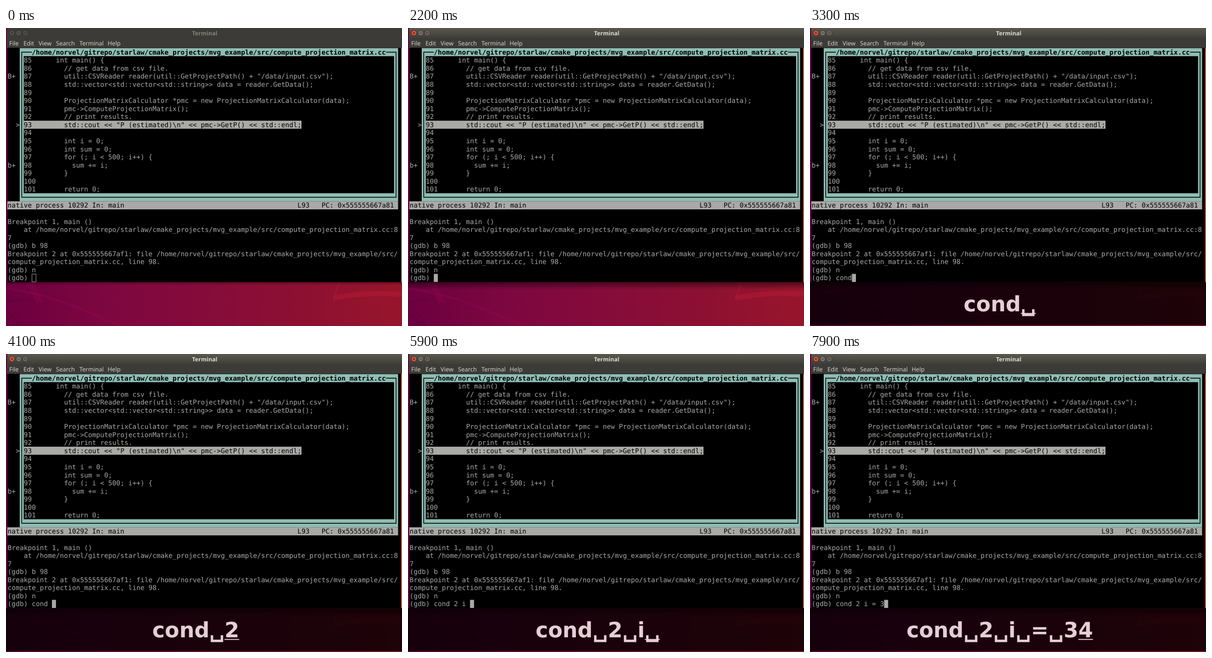
Animation of 863x649 px, one loop 8000 ms. Source, as an HTML page with a canvas:

```html
<!DOCTYPE html>
<html lang="en">
<head>
<meta charset="utf-8">
<title>Terminal</title>
<style>
html, body { margin: 0; width: 100%; height: 100%; overflow: hidden; background: #000; }
canvas { display: block; }
</style>
</head>
<body>
<canvas id="stage" width="863" height="649"></canvas>
<script>
const W = 863, H = 649, LOOP = 8000;
const ctx = document.getElementById('stage').getContext('2d');
const keys = document.createElement('canvas');
keys.width = W;
keys.height = H;
const kctx = keys.getContext('2d');

// Terminal grid
const CW = 8.772, RH = 17.56, X0 = 3.6, Y0 = 43.8;
const MONO = '14.57px "DejaVu Sans Mono", monospace';
const UI = '"Open Sans", "Noto Sans", sans-serif';
const GREY = '#a9a9a7', TEAL = '#8fbdb3', BAR = '#3c3b37', BOTTOM = 553.5;
const colX = c => X0 + c * CW;
const rowY = r => Y0 + r * RH;

const DIR = '/home/norvel/gitrepo/starlaw/cmake_projects/mvg_example/src/';
const FILE = 'compute_projection_matrix.cc';
const SOURCE = [
  'int main() {',
  '  // get data from csv file.',
  '  util::CSVReader reader(util::GetProjectPath() + "/data/input.csv");',
  '  std::vector<std::vector<std::string>> data = reader.GetData();',
  '',
  '  ProjectionMatrixCalculator *pmc = new ProjectionMatrixCalculator(data);',
  '  pmc->ComputeProjectionMatrix();',
  '  // print results.',
  '  std::cout << "P (estimated)\\n" << pmc->GetP() << std::endl;',
  '',
  '  int i = 0;',
  '  int sum = 0;',
  '  for (; i < 500; i++) {',
  '    sum += i;',
  '  }',
  '',
  '  return 0;'
];
const LOG = [
  'Breakpoint 1, main ()',
  '    at ' + DIR + FILE + ':8',
  '7',
  '(gdb) b 98',
  'Breakpoint 2 at 0x555555667af1: file ' + DIR,
  FILE + ', line 98.',
  '(gdb) n'
];

// Timing: when each key reaches the shell, and when it shows in the key display
const COMMAND = 'cond 2 i = 34';
const TYPED = [2500, 2700, 2800, 3000, 3500, 4300, 4800, 5500, 5900, 6400, 6900, 7300];
const SHOWN = [2400, 2500, 2700, 2800, 3300, 4100, 4700, 5300, 5900, 6200, 6700, 7100, 7900];
const MARKED = [[3300, 3500], [4100, 4300], [4700, 5000], [5300, 5500], [5900, 6400], [6700, 6900], [7100, 7300], [7900, 8000]];
const BLINK = [[1900, 2200], [3900, 4100], [4700, 4800], [7700, 7900]];
const FADE = [[2600, 1], [2500, 0.75], [2400, 0.35]];

const count = (times, t) => times.filter(x => x <= t).length;
const within = (spans, t) => spans.some(([a, b]) => t >= a && t < b);

function rect(x, y, w, h, fill) {
  ctx.fillStyle = fill;
  ctx.fillRect(x, y, w, h);
}

function text(str, x, y, font, fill, align = 'left') {
  ctx.font = font;
  ctx.fillStyle = fill;
  ctx.textAlign = align;
  ctx.fillText(str, x, y);
}

function cell(str, col, row, fill = GREY, weight = '') {
  text(str, colX(col), rowY(row) + 14, weight + MONO, fill);
}

function path(d, color, width) {
  ctx.strokeStyle = color;
  ctx.lineWidth = width;
  ctx.stroke(new Path2D(d));
}

function gradient(x0, y0, x1, y1, ...stops) {
  const g = ctx.createLinearGradient(x0, y0, x1, y1);
  stops.forEach((c, i) => g.addColorStop(i / (stops.length - 1), c));
  return g;
}

function wallpaper(focus) {
  rect(0, 0, W, H, gradient(0, 620, W, 580, '#6c0040', '#7d0740', '#850b3a', '#8d1032', '#98152b'));
  path('M0 567 Q75 578 135 601 T250 649', 'rgba(150,10,85,.28)', 5);
  path('M52 554 L74 598', 'rgba(150,10,85,.28)', 14);
  path('M0 598 Q40 585 74 598', 'rgba(80,0,50,.22)', 3);
  path('M726 554 L714 590', 'rgba(185,30,52,.35)', 4);
  path('M713 588 Q785 574 863 580', 'rgba(185,30,52,.42)', 11);
  path('M563 554 V649 M430 590 L563 600 L640 649', 'rgba(170,25,60,.13)', 2);
  path('M8 630 l8 -4 M18 634 l10 -7 M12 642 l14 -4 M28 640 l12 5 M22 648 l8 -5', 'rgba(60,0,40,.3)', 2);
  const depth = 7 + 9 * focus;
  rect(0, BOTTOM, W, depth, gradient(0, BOTTOM, 0, BOTTOM + depth, `rgba(20,0,10,${0.35 + 0.2 * focus})`, 'rgba(20,0,10,0)'));
}

function button(x, glyph, fill, line) {
  ctx.beginPath();
  ctx.arc(x, 11, 5.7, 0, 7);
  ctx.fillStyle = fill;
  ctx.fill();
  ctx.strokeStyle = '#2e2d29';
  ctx.lineWidth = 1;
  ctx.stroke();
  path(glyph, line, 1.1);
}

function titleBar(focus) {
  ctx.beginPath();
  ctx.roundRect(2, 0, W, 44, [5, 0, 0, 0]);
  ctx.fillStyle = BAR;
  ctx.fill();
  const bar = active => {
    if (active) rect(3, 0, W, 22, gradient(0, 0, 0, 22, '#5b594f', '#3e3d38'));
    text('Terminal', 433, 16, 'bold 12.5px ' + UI, active ? '#dfdbd2' : '#85827a', 'center');
    button(13, 'M11 9l4 4m0 -4l-4 4', active ? '#e2573a' : '#55534c', active ? '#5c1d10' : '#2f2e2a');
    button(27.6, 'M25 11h5', active ? '#77746a' : '#55534c', '#2f2e2a');
    button(42.2, 'M40 9h4.4v4h-4.4z', active ? '#77746a' : '#55534c', '#2f2e2a');
  };
  bar(false);
  if (focus) {
    ctx.globalAlpha = focus;
    bar(true);
    ctx.globalAlpha = 1;
  }
  const menu = { File: 7, Edit: 38, View: 71, Search: 109, Terminal: 160, Help: 221.5 };
  for (const name in menu) text(name, menu[name], 38, '13px ' + UI, '#dfdbd2');
}

function sourcePane() {
  rect(colX(3), rowY(0), 94 * CW, 19 * RH, TEAL);
  rect(colX(4), rowY(1), 92 * CW, 17 * RH, '#000');
  const l = colX(3.5), r = colX(96.5), top = rowY(0.5), end = rowY(18.5);
  path(`M${colX(6)} ${top}H${l}V${end}H${r}V${top}H${colX(94)}`, '#000', 1.6);
  cell(DIR + FILE, 6, 0, '#000', 'bold ');
  SOURCE.forEach((line, i) => {
    const current = i === 8, ink = current ? '#000' : GREY;
    if (current) rect(colX(4), rowY(9), 69 * CW, RH, GREY);
    cell(String(85 + i), 4, i + 1, ink);
    cell(line, 12, i + 1, ink);
  });
  cell('B+', 0, 3);
  cell('>', 2, 9);
  cell('b+', 0, 14);
}

function shell(t, focus) {
  rect(3, rowY(19), colX(97) - 3, RH, GREY);
  cell('native process 10292 In: main', 0, 19, '#000');
  cell('L93   PC: 0x555555667a81', 72, 19, '#000');
  LOG.forEach((line, i) => cell(line, 0, 21 + i));
  const n = count(TYPED, t);
  cell('(gdb) ' + COMMAND.slice(0, n), 0, 28);
  const x = colX(6 + n), y = rowY(28);
  if (!focus) {
    ctx.strokeStyle = GREY;
    ctx.lineWidth = 1;
    ctx.strokeRect(x + 0.4, y + 0.4, CW, RH - 0.6);
  } else if (!within(BLINK, t)) {
    rect(x, y, CW, RH, GREY);
  }
}

function keyDisplay(t) {
  const step = FADE.find(([at]) => t >= at);
  if (!step) return;
  const str = COMMAND.slice(0, count(SHOWN, t)).replace(/ /g, '\u2423');
  kctx.clearRect(0, 0, W, H);
  kctx.fillStyle = '#000';
  kctx.fillRect(0, BOTTOM, W, 647.3 - BOTTOM);
  kctx.font = 'bold 46px "DejaVu Sans", sans-serif';
  kctx.textRendering = 'geometricPrecision';
  kctx.fillStyle = '#fff';
  const width = kctx.measureText(str).width, x = 413.5 - width / 2;
  kctx.fillText(str, x, 617);
  if (within(MARKED, t)) {
    const last = kctx.measureText(str.slice(-1)).width;
    kctx.fillRect(x + width - last, 620.6, last, 2);
  }
  ctx.globalAlpha = 0.8 * step[1];
  ctx.drawImage(keys, 0, 0);
  ctx.globalAlpha = 1;
}

function draw(t) {
  const focus = t < 1300 ? 0 : t < 1400 ? 0.5 : 1;
  ctx.textRendering = 'geometricPrecision';
  wallpaper(focus);
  titleBar(focus);
  rect(3, 43, W, BOTTOM - 43, '#000');
  rect(861, 43, 2, BOTTOM - 43, focus ? '#dd6236' : '#8d8a85');
  sourcePane();
  shell(t, focus);
  keyDisplay(t);
}

const start = performance.now();
function tick() {
  draw((performance.now() - start) % LOOP);
  requestAnimationFrame(tick);
}
tick();
</script>
</body>
</html>
```
